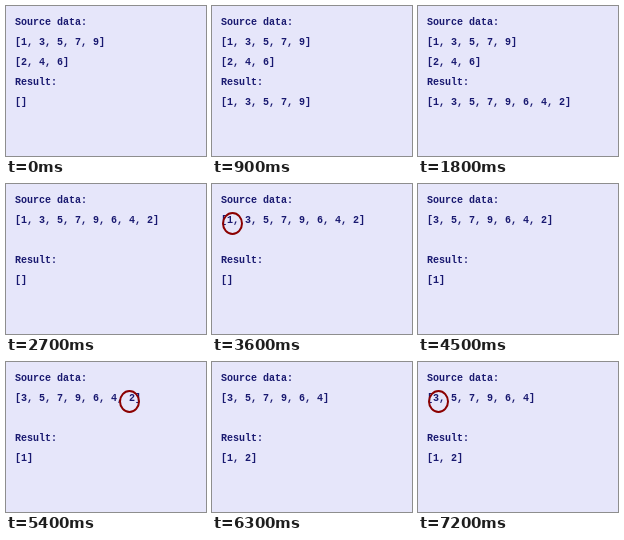
An HTML page for the animation above (8000 ms loop, 200 by 150 pixels).

```html
<!DOCTYPE html>
<html lang="en">
<head>
<meta charset="utf-8">
<title>List operations</title>
<style>
  html, body { margin: 0; width: 100%; height: 100%; overflow: hidden; background: #e6e6fa; }
  svg { display: block; width: 100vw; height: 100vh; }
  text { font: bold 10px "Liberation Mono", monospace; fill: #191970; }
  ellipse { fill: none; stroke: #8b0000; stroke-width: 2; }
</style>
</head>
<body>
<svg viewBox="0 0 200 150">
  <text x="9" y="19">Source data:</text>
  <text x="9" y="39" id="first"></text>
  <text x="9" y="59" id="second"></text>
  <text x="9" y="79">Result:</text>
  <text x="9" y="99" id="result"></text>
  <ellipse id="ring" cy="39.5" rx="9.5" ry="10.5"/>
</svg>
<script>
const LOOP = 8000, STEP = 900;
const LEFT = 20.5, RIGHT = 123.5;
const $ = id => document.getElementById(id);

const odd = [1, 3, 5, 7, 9], even = [2, 4, 6];
const joined = [...odd, ...[...even].reverse()];
const tail = joined.slice(1), middle = tail.slice(0, -1);

// Each step: first list, second list, result, ring centre
const steps = [
  [odd, even, []],
  [odd, even, odd],
  [odd, even, joined],
  [joined, null, []],
  [joined, null, [], LEFT],
  [tail, null, [1]],
  [tail, null, [1], RIGHT],
  [middle, null, [1, 2]],
  [middle, null, [1, 2], LEFT],
];

const format = list => list ? `[${list.join(", ")}]` : "";

function draw(now) {
  const [first, second, result, ringX] = steps[Math.floor(now % LOOP / STEP)];
  $("first").textContent = format(first);
  $("second").textContent = format(second);
  $("result").textContent = format(result);
  $("ring").setAttribute("cx", ringX ?? 0);
  $("ring").setAttribute("visibility", ringX ? "visible" : "hidden");
}

let start;
function tick(now) {
  start ??= now;
  draw(now - start);
  requestAnimationFrame(tick);
}
draw(0);
requestAnimationFrame(tick);
</script>
</body>
</html>
```
